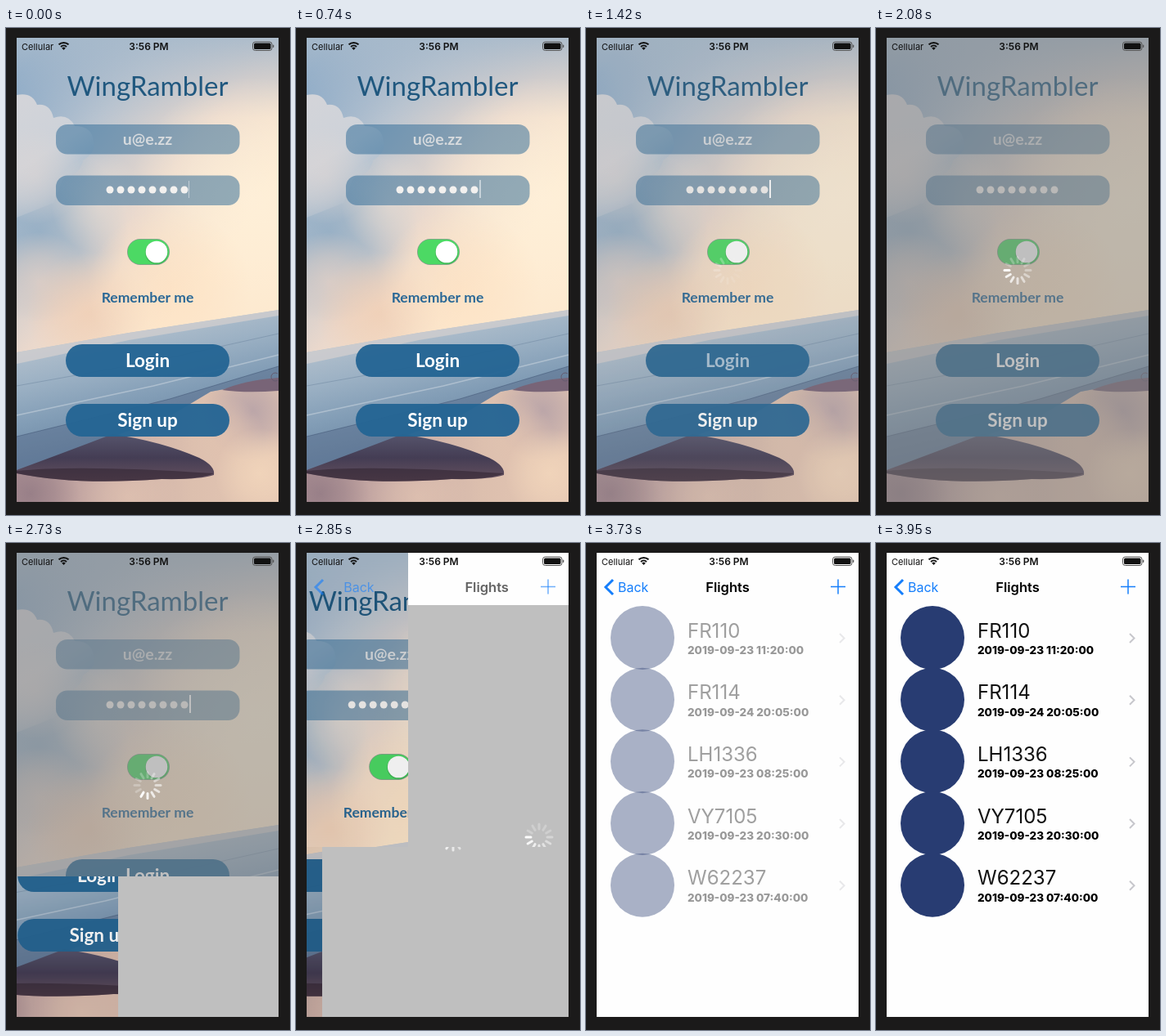
Recreate the animation shown at these times as an HTML page with a canvas. Size 347 by 596 pixels, loop 5.15 s.

```html
<!DOCTYPE html>
<html lang="en">
<head>
<meta charset="utf-8">
<title>Flight login</title>
<style>
html, body { margin: 0; width: 100%; height: 100%; overflow: hidden; background: #1b1a1a; }
canvas { display: block; }
</style>
</head>
<body>
<canvas id="stage" width="347" height="596"></canvas>
<script>
const W = 347, H = 596, LOOP = 5150, PUSH = 2730, DONE = 3730;
const X0 = 13, Y0 = 12, SW = 320, SH = 568;
const UI = 'Inter, "Liberation Sans", sans-serif', HAND = 'Lato, "Open Sans", sans-serif';
const BLUE = '#157efb', INK = '#2a6896';
const STEPS = [0, 210, 740, 860, 1300, 1420, 1520, 1630, 1740, 1860, 1970, 2080, 2180, 2300,
  2520, 2730, 2850, 2970, 3080, 3190, 3290, 3400, 3520, 3630, 3730, 3850, 3950];
const FIRST_PUSH = STEPS.indexOf(PUSH);
const FLIGHTS = [
  ['FR110', '2019-09-23 11:20:00'],
  ['FR114', '2019-09-24 20:05:00'],
  ['LH1336', '2019-09-23 08:25:00'],
  ['VY7105', '2019-09-23 20:30:00'],
  ['W62237', '2019-09-23 07:40:00']
];
let g = document.getElementById('stage').getContext('2d');
const clamp = v => Math.max(0, Math.min(1, v));

function rect(x, y, w, h, fill, r = 0) {
  g.fillStyle = fill;
  g.beginPath();
  g.roundRect(x, y, w, h, r);
  g.fill();
}
function disc(x, y, r, fill) {
  g.fillStyle = fill;
  g.beginPath();
  g.arc(x, y, r, 0, 7);
  g.fill();
}
function line(pts, color, width, cap = 'butt') {
  g.strokeStyle = color;
  g.lineWidth = width;
  g.lineCap = cap;
  g.beginPath();
  pts.forEach(p => g.lineTo(...p));
  g.stroke();
}
function text(s, x, y, font, fill, align = 'left') {
  g.font = font;
  g.fillStyle = fill;
  g.textAlign = align;
  g.fillText(s, x, y);
}
function ramp(x1, y1, x2, y2, ...colors) {
  const r = g.createLinearGradient(x1, y1, x2, y2);
  colors.forEach((c, i) => r.addColorStop(i / (colors.length - 1), c));
  return r;
}
function glow(x, y, r, rgb, a) {
  const s = g.createRadialGradient(x, y, 0, x, y, r);
  s.addColorStop(0, `rgba(${rgb},${a})`);
  s.addColorStop(0.5, `rgba(${rgb},${a * 0.6})`);
  s.addColorStop(1, `rgba(${rgb},0)`);
  disc(x, y, r, s);
}
function shape(path, fill) {
  g.fillStyle = fill;
  g.fill(new Path2D(path));
}
function group(fn, dx = 0, alpha = 1) {
  g.save();
  g.translate(dx, 0);
  g.globalAlpha *= alpha;
  fn();
  g.restore();
}
function band(y1, y2, fn) {
  g.save();
  g.beginPath();
  g.rect(X0, y1, SW, y2 - y1);
  g.clip();
  fn();
  g.restore();
}

// Soft sky with a wing, painted once
function paintPhoto() {
  const c = document.createElement('canvas'), main = g;
  c.width = W;
  c.height = H;
  g = c.getContext('2d');
  rect(0, 0, W, H, ramp(13, 60, 270, 270, '#82a5c6', '#b9c4d0', '#ead8cc', '#fde9cf'));
  rect(0, 0, W, 110, ramp(0, 12, 0, 110, 'rgba(168,186,203,.9)', 'rgba(178,190,204,0)'));
  glow(300, 210, 150, '255,241,218', 0.8);
  glow(40, 250, 110, '141,170,195', 0.8);
  shape('M13 82Q32 78 38 94Q54 92 58 110Q76 104 84 120Q106 120 107 140Q110 152 94 162Q92 178 70 184L58 214L13 232Z',
    ramp(13, 90, 90, 210, '#d3d4d9', '#cdd2d9', '#9fb4c7'));
  glow(35, 180, 60, '222,214,212', 0.6);
  glow(115, 215, 60, '238,224,212', 0.6);
  glow(40, 310, 60, '226,208,198', 0.75);
  glow(100, 350, 75, '240,206,180', 0.8);
  glow(200, 320, 100, '253,226,196', 0.8);
  // clouds below the wing
  rect(0, 425, W, 160, ramp(13, 0, 333, 0, '#b79a9b', '#c8aba5', '#dcbfae', '#e5c7b3'));
  glow(300, 470, 60, '176,157,166', 0.8);
  glow(265, 500, 50, '224,194,176', 0.8);
  glow(310, 545, 55, '243,215,188', 0.8);
  glow(150, 575, 60, '226,196,178', 0.7);
  glow(30, 570, 60, '130,108,122', 0.6);
  // wing
  shape('M13 397L150 373L333 345V430L250 445L200 475L130 500L13 542Z',
    ramp(90, 375, 120, 510, '#b4c1cd', '#9cb1c4', '#829db6', '#6d88a4'));
  shape('M13 397L150 373L333 345V352L150 382L13 411Z', 'rgba(211,207,207,.75)');
  shape('M13 500L200 454L333 414V430L250 445L200 475L130 500L13 542Z', 'rgba(89,112,143,.55)');
  line([[13, 438], [180, 408], [333, 374]], 'rgba(90,115,145,.35)', 1);
  line([[13, 474], [180, 438], [333, 400]], 'rgba(218,224,230,.45)', 1.5);
  line([[13, 500], [200, 454], [333, 414]], 'rgba(60,80,112,.5)', 1);
  shape('M264 443Q292 431 333 428V444Q293 447 264 443Z', '#786477');
  g.strokeStyle = '#665c70';
  g.lineWidth = 1;
  g.beginPath();
  g.arc(329, 427, 5, 1, 5.3);
  g.stroke();
  shape('M13 541Q70 520 130 497Q190 506 236 526Q256 536 254 547Q235 553 190 552Q85 560 13 545Z',
    ramp(0, 497, 0, 555, '#56546c', '#443d54', '#66515e'));
  shape('M13 542Q90 534 254 545Q235 553 190 552Q85 560 13 545Z', 'rgba(50,37,51,.6)');
  g = main;
  return c;
}
const photo = paintPhoto();

function cursorAlpha(t) {
  if (t >= 2300 || (t >= 1300 && t < 1860) || (t >= 210 && t < 740)) return 1;
  return t === 740 || t === 1860 ? 0.5 : 0;
}

function login(t) {
  g.drawImage(photo, 0, 0);
  text('WingRambler', 173, 83, '33px ' + HAND, '#20587f', 'center');
  for (const y of [118, 180.5]) rect(61, y, 224.5, 36.5, 'rgba(42,104,150,.5)', 14);
  text('u@e.zz', 173, 143, 'bold 19.5px ' + HAND, 'rgba(236,234,232,.8)', 'center');
  for (let i = 0; i < 8; i++) disc(127 + i * 13, 198, 4.5, '#f3f1ef');
  const a = cursorAlpha(t);
  if (a) rect(224, 186, 2, 22, `rgba(255,255,255,${a})`);
  else if (t < 1300) rect(223, 187, 1, 21, 'rgba(225,230,235,.6)');

  rect(148, 258, 52, 32, '#8d9a91', 16);
  rect(148.7, 258.7, 50.6, 30.6, '#4cd964', 15.3);
  disc(184, 275, 14, 'rgba(0,0,0,.15)');
  disc(184, 274, 13.3, '#fff');
  text('Remember me', 173, 336, 'bold 17.5px ' + HAND, INK, 'center');

  const pressed = t > 1300 && t < 1970 ? 0.6 + 0.4 * clamp((t - 1420) / 500) : 1;
  [['Login', 387, pressed], ['Sign up', 460, 1]].forEach(([label, y, alpha]) => {
    rect(73, y, 200, 40, 'rgba(37,101,148,.96)', 20);
    text(label, 173, y + 28, 'bold 22.5px ' + HAND, `rgba(255,255,255,${alpha})`, 'center');
  });
}

function spinner(x, y, t) {
  const head = Math.floor((t - 2850) / 65) + 21;
  for (let i = 0; i < 12; i++) {
    const age = (head - i + 24) % 12, a = i * Math.PI / 6;
    const sx = Math.sin(a), sy = -Math.cos(a);
    line([[x + 10 * sx, y + 10 * sy], [x + 16 * sx, y + 16 * sy]],
      `rgba(255,255,255,${Math.max(0.25, 0.95 - age * 0.1)})`, 3, 'round');
  }
}

function waiting(t) {
  login(t);
  const k = clamp((t - 1300) / 440);
  if (!k) return;
  rect(X0, Y0, SW, SH, `rgba(128,128,128,${k / 2})`);
  group(() => spinner(173, 296.5, t), 0, k);
}

function navItems(off) {
  const alpha = 1 - off / SW;
  group(() => {
    line([[33, 45], [24, 54], [33, 63]], BLUE, 3);
    text('Back', 39 + off * 0.155, 60, '16px ' + UI, BLUE);
    text('Flights', 173 + off * 0.485, 60, '600 16.5px ' + UI, '#000', 'center');
    line([[299, 53.5], [317, 53.5]], BLUE, 1.5);
    line([[308, 44.5], [308, 62.5]], BLUE, 1.5);
  }, 0, alpha);
}

// The flights page slides in from the right, the login page drifts left under it
function pushed(k, t) {
  if (k < 0) return waiting(t);
  let off = 124 * 0.153 ** k;
  if (off < 0.5) off = 0;
  const gone = SW - off;
  group(() => login(t), -0.3 * gone);
  rect(X0, Y0, SW, SH, `rgba(0,0,0,${0.1 * gone / SW})`);
  group(() => {
    rect(X0, Y0, SW, SH, '#bfbfbf');
    rect(X0, Y0, SW, 64, '#fefefe');
    spinner(173, 360, t);
  }, off);
  navItems(off);
}

function list(t) {
  rect(X0, Y0, SW, SH, '#fefefe');
  navItems(0);
  group(() => FLIGHTS.forEach(([code, time], i) => {
    const y = 116 + i * 75.67;
    disc(69, y, 39, '#283c72');
    text(code, 124, y - 0.5, '24px ' + UI, '#111');
    text(time, 124, y + 20, '800 13.5px ' + UI, '#000');
    line([[310, y - 5], [315.5, y + 0.5], [310, y + 6]], '#c7c7cc', 2);
  }), 0, clamp(0.4 + (t - DONE) / 300));
}

function statusBar() {
  text('Cellular', 19, 26.5, '11px ' + UI, '#111');
  text('3:56 PM', 174.5, 26.5, '600 12px ' + UI, '#111', 'center');
  g.strokeStyle = '#111';
  g.lineWidth = 2;
  g.lineCap = 'butt';
  for (const r of [5, 8.6]) {
    g.beginPath();
    g.arc(70.5, 26.5, r, -2.34, -0.8);
    g.stroke();
  }
  shape('M70.5 27L68.2 24.4Q70.5 22.7 72.8 24.4Z', '#111');
  g.lineWidth = 1;
  g.strokeStyle = '#555';
  g.beginPath();
  g.roundRect(301.5, 17, 23.5, 10.5, 3);
  g.stroke();
  rect(303, 18.5, 20.5, 7.5, '#111', 1.5);
  rect(326, 20.5, 1.3, 3.5, '#555', 1);
}

function draw(now) {
  const clock = now % LOOP;
  const step = STEPS.findLastIndex(s => s <= clock), t = STEPS[step];
  rect(0, 0, W, H, '#1b1a1a');
  band(Y0, Y0 + SH, () => {
    if (t < PUSH) waiting(t);
    else if (t >= DONE) list(t);
    else {
      // each refresh is torn: the upper part lags one step behind
      const k = step - FIRST_PUSH, tear = 408 - 36 * k;
      band(Y0, tear, () => pushed(k - 1, t));
      band(tear, Y0 + SH, () => pushed(k, t));
    }
    statusBar();
  });
}

let start;
function tick(now) {
  start ??= now;
  draw(now - start);
  requestAnimationFrame(tick);
}
requestAnimationFrame(tick);
</script>
</body>
</html>
```
